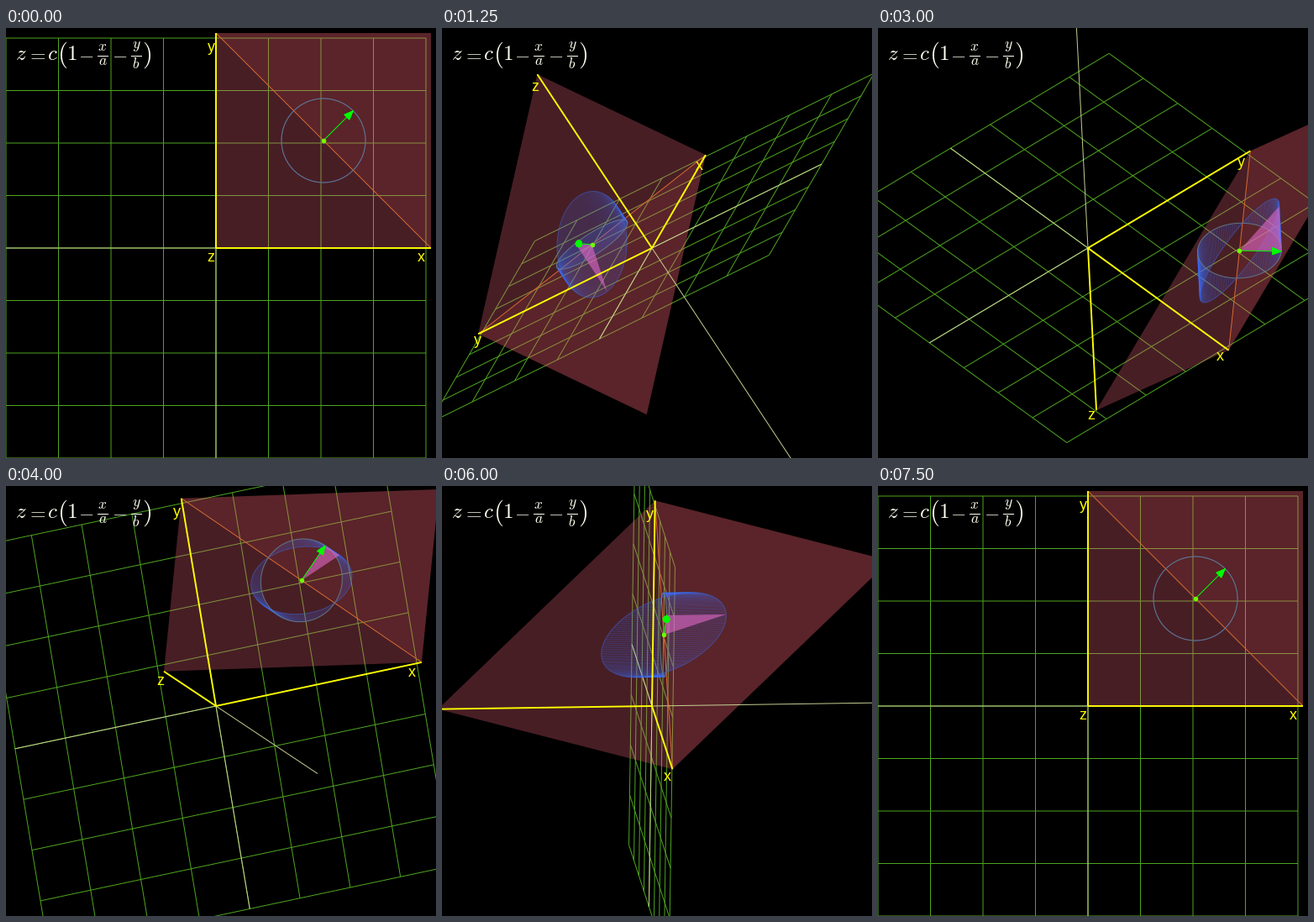
These frames come from a looping animation (512 by 512 pixels, 7750 ms). A matplotlib script:

```python
import numpy as np
import matplotlib.pyplot as plt
from matplotlib.animation import FuncAnimation
from matplotlib.collections import LineCollection, PolyCollection

plt.rcParams["mathtext.fontset"] = "cm"

SIZE, DPI = 512, 64
PX = 72 / DPI                      # points per pixel
STEPS = 30                         # steps in one full turn
ORIGIN = np.array([250.0, 262.0])
AXIS, GRID, CELL, RADIUS = 256, 250, 62.5, 50


def rgb(r, g, b, a=1.0):
    return (r / 255, g / 255, b / 255, a)


GREEN = rgb(0, 255, 0)
YELLOW = rgb(255, 255, 0)
CREAM = rgb(255, 255, 240)


def view(n):
    """Rows: screen directions of x, y and z after Rz(t) Ry(t) Rx(-t)."""
    t = 2 * np.pi * (n % STEPS) / STEPS
    c, s = np.cos(t), np.sin(t)
    m = np.array([
        [c * c, c * s],
        [-c * s * (1 + s), c * c - s ** 3],
        [c * c * s - s * s, c * s * s + c * s],
    ])
    return m * [1, -1]


# Geometry in 3D
ex, ey, ez = np.eye(3)
zero = np.zeros(3)
center = AXIS * (ex + ey) / 2
slope = (ex + ey) / np.sqrt(2)

ticks = np.arange(-4, 5) * CELL
grid = np.array([[k * ex - GRID * ey, k * ex + GRID * ey] for k in ticks]
                + [[k * ey - GRID * ex, k * ey + GRID * ex] for k in ticks])
negative = np.array([[zero, -GRID * ex], [zero, -GRID * ey], [zero, -2 * GRID * ez]])
positive = np.array([[zero, AXIS * e] for e in (ex, ey, ez)])
diagonal = np.array([[AXIS * ex, AXIS * ey]])
inner = AXIS * np.array([[ez, ex, ey]])
outer = AXIS * np.array([[ex, ex + ey - ez, ey]])

theta = np.linspace(0, 2 * np.pi, 181)
rim = center + RADIUS * (np.outer(np.cos(theta), ex) + np.outer(np.sin(theta), ey))
drop = -RADIUS * (np.cos(theta) + np.sin(theta))
slant = rim + np.outer(drop, ez)
wall = np.stack([rim, slant], axis=1)[:-1]

tip = center + RADIUS * slope
wedge = np.array([[center, tip, tip - RADIUS * np.sqrt(2) * ez]])

# Arrow head: a small cone
neck = center + (RADIUS - 10.5) * slope
side = (ey - ex) / np.sqrt(2)
phi = np.linspace(0, 2 * np.pi, 25)
base = neck + 4.3 * (np.outer(np.cos(phi), side) + np.outer(np.sin(phi), ez))
cone = np.array([[tip, neck, a, b] for a, b in zip(base[:-1], base[1:])])
cone_sides = cone[:, [0, 2, 3]]
cone_base = cone[:, [1, 2, 3]]
shaft = np.array([[center, neck]])

# Stage
fig = plt.figure(figsize=(SIZE / DPI, SIZE / DPI), dpi=DPI, facecolor="black")
ax = fig.add_axes([0, 0, 1, 1])
ax.set_xlim(0, SIZE)
ax.set_ylim(SIZE, 0)
ax.axis("off")

parts = []


def add_part(art, points):
    art.set_snap(False)
    art.set_zorder(len(parts) + 1)
    ax.add_collection(art, autolim=False)
    parts.append((art, points))


def add_lines(points, color, width):
    add_part(LineCollection([], colors=[color], linewidths=width * PX), points)


def add_fill(points, color, edge=0):
    add_part(PolyCollection([], facecolors=[color], linewidths=edge * PX,
                            edgecolors=[color] if edge else "none"), points)


add_lines(grid, rgb(78, 165, 32), 1)
add_fill(inner, rgb(255, 105, 132, 0.285))
add_fill(outer, rgb(255, 102, 118, 0.355))
add_lines(negative, rgb(205, 215, 150, 0.95), 1)
add_lines(diagonal, rgb(215, 105, 50), 1)
add_lines(wall, rgb(60, 110, 255, 0.3), 1)
add_lines(slant[None], rgb(60, 105, 225, 0.5), 1)
add_lines(rim[None], rgb(100, 125, 140, 0.9), 1)
add_fill(wedge, rgb(225, 105, 200, 0.6))
add_lines(positive, YELLOW, 1.9)
add_lines(shaft, GREEN, 1)
add_fill(cone_base, GREEN, 0.3)
add_fill(cone_sides, GREEN, 0.3)

dot, = ax.plot([], [], "o", ms=5.6 * PX, mew=0, color=rgb(110, 255, 0),
               zorder=30, snap=False)


def write(x, y, text, size, color, **kw):
    return ax.text(x, y, text, fontsize=size * PX, color=color, ha="center",
                   va="baseline", zorder=40, **kw)


labels = [write(0, 0, name, 18, YELLOW, family="Liberation Sans") for name in "xyz"]

# Formula: centre, baseline, glyph, size
for x, y, glyph, size in [
    (18, 38, "z", 25), (36, 38, "=", 24), (55.5, 38, "c", 25),
    (67, 40, "(", 31), (78, 38, "1", 25), (95.5, 38, "-", 23.5),
    (115, 27, "x", 17.5), (115, 44.5, "a", 17.5), (135, 38, "-", 23.5),
    (155, 24.5, "y", 17.5), (155, 47.5, "b", 17.5), (167, 40, ")", 31),
]:
    write(x, y, f"${glyph}$", size, CREAM)
for x in (115, 155):
    ax.plot([x - 6, x + 6], [32.5, 32.5], color=CREAM, lw=1 * PX, zorder=40)


def draw(n):
    m = view(n)
    for art, points in parts:
        art.set_verts(list(ORIGIN + points @ m))
    x, y = ORIGIN + center @ m
    dot.set_data([x], [y])
    for label, direction in zip(labels, m):
        label.set_position(ORIGIN + GRID * direction + [-6, 15.5])
    return [art for art, _ in parts] + [dot] + labels


anim = FuncAnimation(fig, draw, frames=STEPS + 1, interval=250,
                     repeat=True, repeat_delay=0, blit=False)
plt.show()
```
